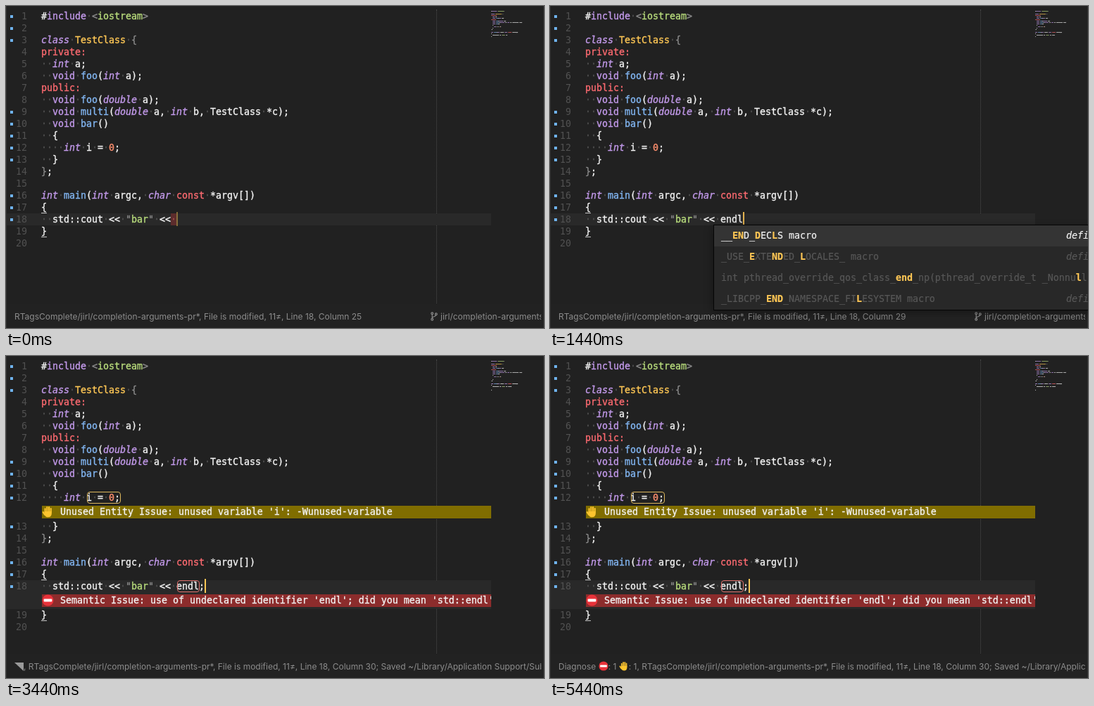
An HTML page for the animation above (5520 ms loop, 764 px wide and 458 px high).

```html
<!DOCTYPE html>
<html lang="en">
<head>
<meta charset="utf-8">
<title>Code completion and diagnostics</title>
<style>
html, body { margin: 0; width: 100%; height: 100%; overflow: hidden; background: #212121; }
#stage {
  position: relative; width: 764px; height: 458px; overflow: hidden;
  background: #212121; color: #f2f2f2;
  font: 13.29px/17px "DejaVu Sans Mono", "Liberation Mono", monospace;
  font-variant-ligatures: none; white-space: pre;
}
#stage::after { content: ""; position: absolute; inset: 0; border: solid #2f2f2f; border-width: 0 1px; }
#ruler { position: absolute; left: 611px; top: 5px; height: 418px; border-left: 1px dotted #4c4c4c; }

.lines { position: absolute; top: 6px; z-index: 0; }
#code { left: 50px; -webkit-text-stroke: .35px; }
#mini { left: 689px; transform: scale(.125, .1176); transform-origin: 0 0; opacity: .7; }
.line { position: relative; height: 17px; }
.diag .l12, .diag .l18 { margin-bottom: 24px; }
#code .l18::before {
  content: ""; position: absolute; z-index: -1; left: -49px; top: 0; width: 688px; height: 17px; background: #292929;
}
#code.diag .l18::before { height: 41px; }
#mini .gutter { display: none; }
#mini .w { visibility: hidden; }
#mini .txt span { background: linear-gradient(transparent 25%, currentColor 25% 80%, transparent 80%); }
.gutter { position: absolute; left: -50px; width: 30px; text-align: right; color: #515151; -webkit-text-stroke: 0; }
.mark::before { content: ""; position: absolute; left: 6px; top: 7px; width: 4px; height: 4px; background: #6fb3ee; }

.w { color: #4e4e4e; }
.k, .t { color: #c39aeb; }
.t { font-style: italic; }
.r { color: #fb6a70; }
.y { color: #fdc655; }
.f { color: #82b6f2; }
.n { color: #f78c6c; }
.s { color: #b8dc7c; }
.g { color: #8a8a8a; }
#code .match { display: inline-block; height: 17px; box-shadow: inset 0 -1px #c4c4c4; }
#code .trail { display: inline-block; height: 17px; background: #5c2c2c; color: #a04a4a; }

#caret { position: absolute; top: -2px; width: 2px; height: 20px; background: #fdc655; }
.box { position: absolute; top: 0; height: 15px; border: 1px solid; border-radius: 4px; margin-left: 1px; display: none; }
.note {
  position: absolute; left: 1px; top: 20px; width: 638px; height: 18px; line-height: 17px;
  overflow: hidden; display: none;
}
.note span { position: absolute; left: 26px; }
.note svg { width: 17px; height: 17px; }
.diag .box, .diag .note { display: block; }

#status, #branch {
  position: absolute; top: 424px; height: 34px; line-height: 35px; overflow: hidden;
  font-family: Inter, Roboto, sans-serif; font-size: 12px; color: #8c8c8c;
}
#bar { position: absolute; left: 0; top: 424px; width: 764px; height: 34px; background: #222; }
#status { left: 12px; width: 748px; }
#status svg { width: 14px; height: 14px; vertical-align: -2px; }
#branch { left: 603px; width: 157px; }
#branch svg { position: absolute; left: 0; top: 11px; }
#branch span { position: absolute; left: 14px; top: 0; }
.spin { display: inline-block; width: 13px; height: 12px; vertical-align: -2px; background: #9a9a9a; }

#popup {
  position: absolute; left: 232px; top: 311px; overflow: hidden; z-index: 2;
  background: #282828; border: 1px solid #050505; box-sizing: border-box;
  box-shadow: 0 3px 12px rgba(0, 0, 0, .4); color: #575757; -webkit-text-stroke: .2px;
}
.row { position: relative; height: 30px; line-height: 29px; padding-left: 10px; }
.row:first-child { background: #343434; color: #f2f2f2; }
.row b { color: #fdc655; }
.row i { position: absolute; right: 11px; top: 0; }
.thumb { position: absolute; right: 3px; top: 5px; width: 4px; height: 24px; border-radius: 2px; background: #555; }
</style>
</head>
<body>
<div id="stage">
  <div id="ruler"></div>
  <div id="code" class="lines"></div>
  <div id="mini" class="lines"></div>
  <div id="bar"></div>
  <div id="status"></div>
  <div id="branch">
    <svg width="10" height="13" viewBox="0 0 10 13" fill="none" stroke="#8c8c8c" stroke-width="1.2">
      <circle cx="2.2" cy="2.2" r="1.4"/><circle cx="2.2" cy="10.8" r="1.4"/><circle cx="7.8" cy="3.2" r="1.4"/>
      <path d="M2.2 3.6V9.4M7.8 4.6C7.8 7.4 2.2 6 2.2 9"/>
    </svg><span>jirl/completion-arguments</span>
  </div>
  <div id="popup"></div>
</div>
<script>
const LOOP = 5520;
const $ = id => document.getElementById(id);

const source = `#include <iostream>

class TestClass {
private:
  int a;
  void foo(int a);
public:
  void foo(double a);
  void multi(double a, int b, TestClass *c);
  void bar()
  {
    int i = 0;
  }
};

int main(int argc, char const *argv[])
{
  std::cout << "bar" << 
}
`.split('\n');
const marked = [1, 2, 3, 9, 10, 11, 12, 13, 16, 17, 18];

const stop = '<svg viewBox="0 0 16 16"><circle cx="8" cy="8" r="7.5" fill="#e8323a"/>' +
  '<rect x="2.5" y="6.2" width="11" height="3.6" rx=".8" fill="#fff"/></svg>';
const hand = '<svg viewBox="0 0 16 16" fill="none" stroke="#fcc52f" stroke-width="2" stroke-linecap="round">' +
  '<path d="M4.3 9V4M6.9 8V2M9.5 8V2M12 9V3.8M3.8 12L1.6 8.6"/>' +
  '<path d="M4.4 8.6H12V11.2Q11.4 14.4 8.4 14.4Q5.4 14.4 4.4 11.6Z" fill="#fcc52f"/></svg>';

// Group names double as class names
const token = new RegExp([
  '(?<w> )',
  '(?<k>include|void)',
  '(?<t>\\b(?:class|int|double|char)\\b)',
  '(?<r>private:|public:|const)',
  '(?<y>(?<=class )TestClass)',
  '(?<f>\\b(?:foo|multi|bar|main)(?=\\())',
  '(?<n>\\b0)',
  '(?<s>iostream|(?<=")bar)',
  '(?<g>"|<(?=io)|(?<=eam)>|(?<=Class )\\{|^\\}(?=;))',
  '(?<p>\\w+|.)'
].join('|'), 'g');

function paint(text) {
  return text.replace(token, (...m) => {
    const kind = Object.entries(m.at(-1)).find(e => e[1] !== undefined)[0];
    const shown = kind === 'w' ? '·' : m[0].replace('<', '&lt;');
    return `<span class="${kind}">${shown}</span>`;
  });
}

const box = (col, len, color) => `<div class="box" style="left:${col}ch;width:calc(${len}ch - 2px);color:${color}"></div>`;
const note = (icon, text, color) => `<div class="note" style="background:${color}">${icon}<span>${text}</span></div>`;
const extras = {
  12: box(8, 6, '#dcb65c') +
    note(hand, "Unused Entity Issue: unused variable 'i': -Wunused-variable", '#806d00'),
  18: box(24, 4, '#e0706c') +
    note(stop, "Semantic Issue: use of undeclared identifier 'endl'; did you mean 'std::endl'?", '#8c2c2c') +
    '<div id="caret"></div>'
};

function buildLines(full) {
  return source.map((text, i) => {
    const n = i + 1;
    const body = n === 17 || n === 19 ? `<span class="match">${text}</span>` : paint(text);
    return `<div class="line l${n}"><span class="gutter${marked.includes(n) ? ' mark' : ''}">${n}</span>` +
      `<span class="txt">${body}</span>${full && extras[n] || ''}</div>`;
  }).join('');
}
$('code').innerHTML = buildLines(true);
$('mini').innerHTML = buildLines(false);

// Brackets mark the matched letters
const enumRows = [
  ['[en]um', 'Enumeration'],
  ['[en]um', 'NotImplemented'],
  ['[EN]AMETOOLONG macro', 'definition'],
  ['[EN]EEDAUTH macro', 'definition'],
  ['[EN]ETDOWN macro', 'definition']
];
const popups = {
  none: { rows: [] },
  e: { width: 301, thumb: true, rows: enumRows.map(([a, b]) => [a.replace(/(.)\]/, ']$1'), b]) },
  en: { width: 301, thumb: true, rows: enumRows },
  endl: { width: 593, rows: [
    ['__[EN]D_[D]EC[L]S macro', 'definition'],
    ['_USE_[E]XTE[ND]ED_[L]OCALES_ macro', 'definition'],
    ['int pthread_override_qos_class_[end]_np(pthread_override_t _Nonnu[l]l', ''],
    ['_LIBCPP_[END]_NAMESPACE_FI[L]ESYSTEM macro', 'definition']
  ] }
};

function showPopup(name) {
  const { rows, width, thumb } = popups[name];
  const el = $('popup');
  el.style.display = rows.length ? 'block' : 'none';
  el.style.width = width + 'px';
  el.innerHTML = rows.map(([text, label]) =>
    `<div class="row">${text.replace(/\[/g, '<b>').replace(/\]/g, '</b>')}<i>${label}</i></div>`
  ).join('') + (thumb ? '<div class="thumb"></div>' : '');
}

function showText(typed) {
  const html = typed ? paint(source[17] + typed)
    : paint(source[17].slice(0, -1)) + '<span class="w trail">·</span>';
  document.querySelectorAll('.l18 .txt').forEach(el => el.innerHTML = html);
  $('caret').style.left = 24 + typed.length + 'ch';
}

const corners = ['100% 100%', '0 100%', '0 0', '100% 0'];
function spinner(step) {
  const at = k => corners[(step + k + 4) % 4];
  return `<span class="spin" style="clip-path:polygon(${at(-1)},${at(0)},${at(1)})"></span>, `;
}

function showStatus(lead, column, saved) {
  $('status').innerHTML = lead +
    `RTagsComplete/jirl/completion-arguments-pr*, File is modified, 11≠, Line 18, Column ${column}` +
    (saved ? '; Saved ~/Library/Application Support/Sublime Text 3/Packages' : '');
  $('branch').style.display = saved ? 'none' : 'block';
}

const keys = [[-480, ''], [160, 'e'], [600, 'en'], [760, 'end'], [1040, 'endl'], [1960, 'endl;']];
const popupTimes = [[0, 'none'], [400, 'e'], [600, 'en'], [1200, 'endl'], [1960, 'none']];
const SAVED = 2640, NOTES = 3400, DIAGNOSED = 3680;
const last = (list, t) => list.filter(e => e[0] <= t).at(-1);

// Caret: hold, fade out, stay hidden, fade in
function blink(age) {
  const p = age % 1120;
  if (p < 380) return 1;
  if (p < 560) return 1 - (p - 380) / 180;
  return p < 920 ? 0 : Math.min(1, (p - 920) / 180);
}

const seen = {};
function update(key, value, draw) {
  if (seen[key] === value) return;
  seen[key] = value;
  draw();
}

const start = performance.now();
function frame() {
  const t = (performance.now() - start) % LOOP;
  const [since, typed] = last(keys, t);
  const popup = last(popupTimes, t)[1];
  const saved = t >= SAVED, notes = t >= NOTES;
  const lead = t >= DIAGNOSED ? `Diagnose ${stop}: 1 ${hand}: 1, `
    : saved ? spinner(Math.floor(t / 80) % 4) : '';

  update('text', typed, () => showText(typed));
  update('popup', popup, () => showPopup(popup));
  update('status', lead + typed.length + saved, () => showStatus(lead, 25 + typed.length, saved));
  update('notes', notes, () => ['code', 'mini'].forEach(id => $(id).classList.toggle('diag', notes)));
  $('caret').style.opacity = blink(t - since);
  requestAnimationFrame(frame);
}
frame();
</script>
</body>
</html>
```
